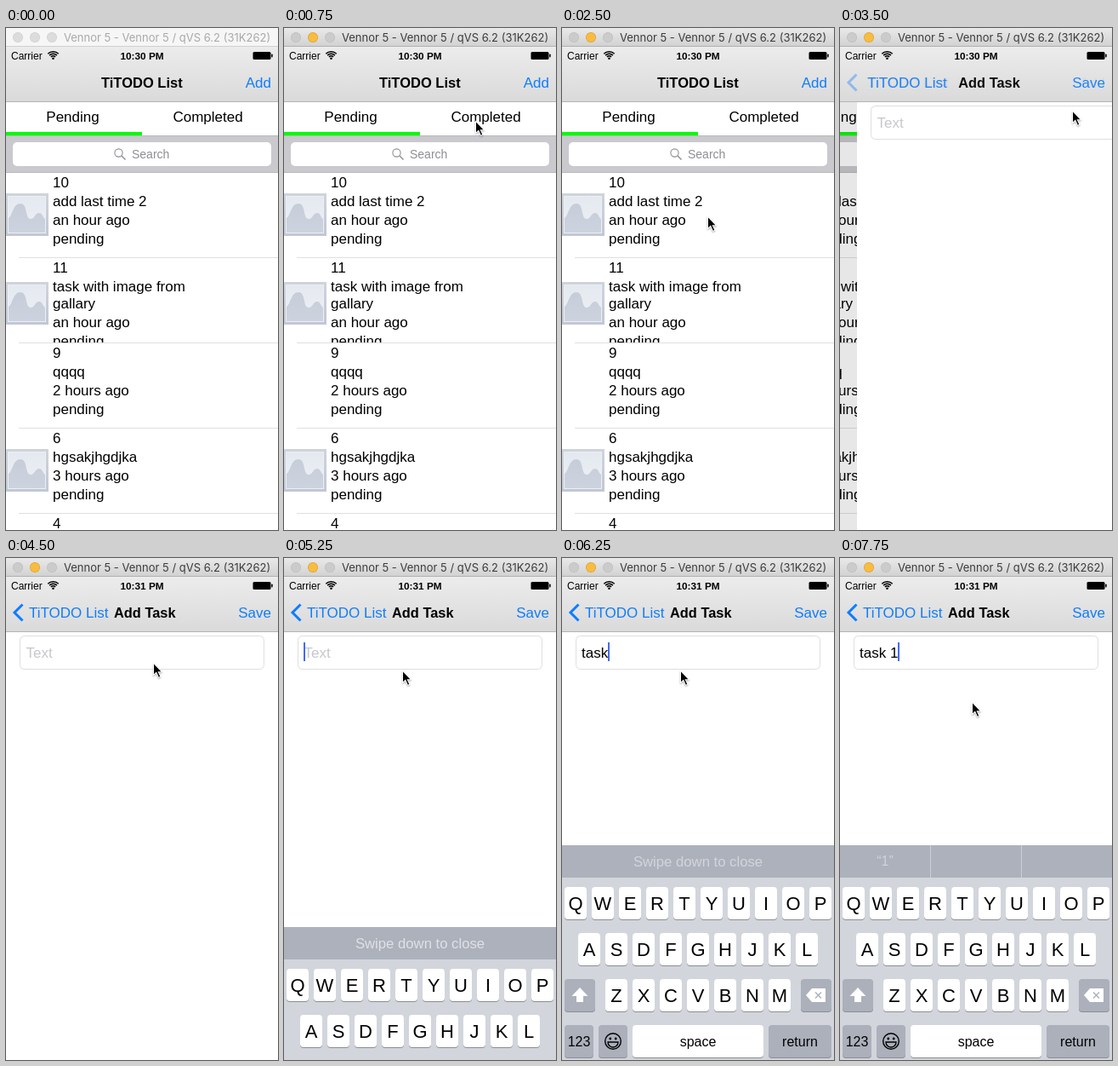
These frames come from a looping animation (320x589 px, 8 s). An HTML page with a canvas:

```html
<!DOCTYPE html>
<html lang="en">
<head>
<meta charset="utf-8">
<title>Todo list demo</title>
<style>
  html, body { margin: 0; width: 100%; height: 100%; overflow: hidden; background: #fff; }
  canvas { display: block; width: 320px; height: 589px; }
</style>
</head>
<body>
<canvas id="stage"></canvas>
<script>
const W = 320, H = 589, LOOP = 8000, STEP = 250;
const SANS = '"Liberation Sans", Arial, sans-serif';
const BLUE = '#0f7dfc';
const canvas = document.getElementById('stage');
const ratio = window.devicePixelRatio || 1;
canvas.width = W * ratio;
canvas.height = H * ratio;
const c = canvas.getContext('2d');
c.scale(ratio, ratio);

const PENDING = [
  { lines: ['10', 'add last time 2', 'an hour ago', 'pending'], pic: 24 },
  { lines: ['11', 'task with image from', 'gallary', 'an hour ago', 'pending'], pic: 28, wrap: true },
  { lines: ['9', 'qqqq', '2 hours ago', 'pending'] },
  { lines: ['6', 'hgsakjhgdjka', '3 hours ago', 'pending'], pic: 24 },
  { lines: ['4'] }
];
const COMPLETED = [
  { lines: ['5', 'Another task', '2 hours ago', 'completed'], pic: 24 },
  { lines: ['7', 'hhey all', '2 hours ago', 'completed'], pic: 24 },
  { lines: ['2', 'Build the app', '3 hours ago', 'completed'], pic: 24 },
  { lines: ['1', 'My Task man', '3 hours ago', 'completed'], pic: 24 },
  { lines: ['3'] }
];

// Pointer stops: time, x, y
const POINTER = [
  [500, 246, 62], [750, 226, 110], [1000, 222, 118], [1500, 222, 118],
  [1750, 160, 90], [2000, 92, 98], [2250, 96, 104], [2500, 172, 222],
  [2750, 220, 150], [3000, 286, 66], [3250, 290, 58], [3500, 274, 98],
  [3750, 274, 98], [4750, 140, 133], [6500, 140, 133], [7500, 156, 170]
];

// Critically damped spring: remaining distance from 1 to 0
function spring(ms) {
  const x = Math.max(0, ms) * 0.018;
  return (1 + x) * Math.exp(-x);
}

function rect(x, y, w, h, fill) {
  c.fillStyle = fill;
  c.fillRect(x, y, w, h);
}

function round(x, y, w, h, r, fill, stroke) {
  c.beginPath();
  c.roundRect(x, y, w, h, r);
  if (fill) { c.fillStyle = fill; c.fill(); }
  if (stroke) { c.strokeStyle = stroke; c.lineWidth = 1; c.stroke(); }
}

function disc(x, y, r, fill) {
  c.beginPath();
  c.arc(x, y, r, 0, 7);
  c.fillStyle = fill;
  c.fill();
}

function poly(points, fill) {
  c.beginPath();
  points.forEach(([x, y]) => c.lineTo(x, y));
  c.closePath();
  c.fillStyle = fill;
  c.fill();
}

function line(points, color, width) {
  c.beginPath();
  points.forEach(([x, y]) => c.lineTo(x, y));
  c.strokeStyle = color;
  c.lineWidth = width;
  c.stroke();
}

function gradient(y, h, top, bottom) {
  const g = c.createLinearGradient(0, y, 0, y + h);
  g.addColorStop(0, top);
  g.addColorStop(1, bottom);
  return g;
}

function text(str, x, y, { size = 17, color = '#000', align = 'left', bold = false, font = SANS } = {}) {
  c.font = `${bold ? 'bold ' : ''}${size}px ${font}`;
  c.fillStyle = color;
  c.textAlign = align;
  c.fillText(str, x, y);
}

function withAlpha(a, draw) {
  if (a <= 0) return;
  c.save();
  c.globalAlpha = Math.min(1, a);
  draw();
  c.restore();
}

function titleBar(active) {
  rect(0, 0, W, 22, active ? gradient(0, 22, '#e9e9e9', '#d1d1d1') : '#f6f6f6');
  rect(0, 21, W, 1, active ? '#b0b0b0' : '#d0d0d0');
  [14, 34, 54].forEach((x, i) => {
    const lit = active && i === 1;
    disc(x, 11, 6, lit ? '#dfa032' : active ? '#bdbdbd' : '#cfcfcf');
    disc(x, 11, 5.3, lit ? '#f8bc3e' : active ? '#cbcbcb' : '#dcdcdc');
  });
  text('Vennor 5 - Vennor 5 / qVS 6.2 (31K262)', 189.5, 16,
    { size: 13, align: 'center', color: active ? '#3c3c3c' : '#a9a9a9', font: 'Inter, sans-serif' });
}

function statusBar(t) {
  text('Carrier', 6, 37, { size: 12 });
  c.strokeStyle = '#000';
  c.lineWidth = 1.6;
  [3.6, 6.2, 8.8].forEach(r => {
    c.beginPath();
    c.arc(55.5, 36.5, r, -Math.PI * 0.75, -Math.PI * 0.25);
    c.stroke();
  });
  disc(55.5, 35.8, 1.3, '#000');
  text(t < 4500 ? '10:30 PM' : '10:31 PM', 160, 36.5, { size: 11.8, bold: true, align: 'center' });
  round(290.5, 28, 21, 9, 1.5, '#000');
  round(312.2, 30.5, 1.5, 4, 1, '#000');
}

function navBar(t, p) {
  rect(0, 22, W, 64, gradient(22, 64, '#ececec', '#dadada'));
  rect(0, 86, W, 1, '#b4b4b4');
  statusBar(t);
  withAlpha(p, () => text('TiTODO List', 112 - 85 * (1 - p), 70, { size: 16.5, bold: true }));
  withAlpha(t === 3250 ? 0.3 : p, () => text('Add', 312, 70, { color: BLUE, align: 'right' }));
  withAlpha(1 - p, () => {
    text('TiTODO List', 27 + 85 * p, 70, { color: BLUE });
    text('Add Task', 127 + 200 * p, 70, { size: 16.4, bold: true });
    text('Save', 292.5, 70, { color: BLUE, align: 'center' });
  });
  withAlpha(1 - p * 10, () => line([[19.5, 54.5], [10, 64], [19.5, 73.5]], BLUE, 3));
}

function thumb(y) {
  c.save();
  c.translate(0, y);
  rect(0, 0, 50, 50, gradient(0, 50, '#cfd3dc', '#c1c7d4'));
  rect(2, 3, 45, 44, '#eceff4');
  rect(3, 4, 43, 42, gradient(4, 42, '#e4e9f0', '#eef1f5'));
  c.beginPath();
  c.moveTo(3, 29);
  c.bezierCurveTo(8, 26, 8, 12, 17, 12);
  c.bezierCurveTo(26, 12, 22, 30, 29, 30);
  c.bezierCurveTo(34, 30, 34, 23, 39, 23);
  c.bezierCurveTo(43, 23, 43, 28, 46, 30);
  c.lineTo(46, 46);
  c.lineTo(3, 46);
  c.fillStyle = gradient(12, 34, '#c6cdd9', '#cdd3de');
  c.fill();
  c.restore();
}

function row(item, y) {
  c.save();
  c.beginPath();
  c.rect(0, y, W, 100);
  c.clip();
  if (item.pic) thumb(y + item.pic);
  item.lines.forEach((str, i) => {
    const shift = item.wrap && i > 1 ? -2 : 0;
    text(str, 55, y + 17 + 22 * i + shift);
  });
  rect(15, y + 99, W - 15, 1, '#e0e0e2');
  c.restore();
}

function listPage(t) {
  const done = t >= 1250 && t < 2250;
  rect(0, 87, W, H - 87, '#fff');
  text('Pending', 78.5, 110, { align: 'center' });
  text('Completed', 237.5, 110, { align: 'center' });
  const bar = t < 2030 ? 160 * (1 - spring(t - 1030)) : 160 * spring(t - 2030);
  rect(Math.round(bar), 122, 160, 4, '#00ff00');
  rect(0, 126, W, 44, '#c9c9ce');
  rect(0, 126, W, 1, '#b8b8bc');
  rect(0, 169, W, 1, '#b8b8bc');
  round(8, 134, 304, 28, 5, '#fff');
  c.beginPath();
  c.arc(132.5, 146.5, 4.6, 0, 7);
  c.strokeStyle = '#8e8e93';
  c.lineWidth = 1.1;
  c.stroke();
  line([[136, 150], [140.5, 154.5]], '#8e8e93', 1.4);
  text('Search', 148, 153, { size: 14, color: '#8e8e93' });
  (done ? COMPLETED : PENDING).forEach((item, i) => row(item, 170 + 100 * i));
}

function typed(t) {
  if (t < 5750) return '';
  if (t < 6000) return 't';
  if (t < 6250) return 'tas';
  if (t < 6750) return 'task';
  return t < 7250 ? 'task ' : 'task 1';
}

function addPage(t) {
  rect(0, 87, W, H - 87, '#fff');
  round(16.5, 91.5, 287, 39, 5, '#fff', '#dedede');
  const str = typed(t);
  if (str) text(str, 23, 116.5);
  else text('Text', 23.5, 116.5, { color: '#c7c7cd' });
  if (t >= 5250) {
    c.font = `17px ${SANS}`;
    rect(23 + Math.round(c.measureText(str).width), 99, 2, 22, '#426bf2');
  }
}

function key(x, y, w, label, size = 22, fill = '#fff') {
  round(x, y + 1, w, 38, 4, '#8a8d93');
  round(x, y, w, 38, 4, fill);
  if (label) text(label, x + w / 2, y + 19 + size * 0.36, { size, align: 'center' });
}

function keyRow(letters, x, y) {
  [...letters].forEach((ch, i) => key(x + 32 * i, y, 26, ch));
}

function suggestions(t) {
  rect(0, 0, W, 38, '#adb1bc');
  if (t < 6750) {
    text('Swipe down to close', 160, 24.5,
      { size: 16.7, align: 'center', color: t < 5500 ? '#dfe1e5' : '#d3d5db' });
    return;
  }
  rect(106, 0, 1, 38, '#cdd0d6');
  rect(213, 0, 1, 38, '#cdd0d6');
  if (t >= 7250) {
    withAlpha(0.65, () => text('“1”', 53, 24, { size: 16, align: 'center', color: '#e4e6ea' }));
  }
}

function smiley(x, y) {
  c.strokeStyle = '#000';
  c.lineWidth = 1.4;
  c.beginPath();
  c.arc(x, y, 9.3, 0, 7);
  c.stroke();
  disc(x - 3.2, y - 3, 1.4, '#000');
  disc(x + 3.2, y - 3, 1.4, '#000');
  c.beginPath();
  c.arc(x, y + 1, 6, 0, Math.PI);
  c.closePath();
  c.stroke();
}

function keyboard(t) {
  const GREY = '#abb0bb', START = 5134;
  if (t < START) return;
  c.save();
  c.translate(0, 337 + Math.round(252 * spring(t - START)));
  rect(0, 38, W, 214, '#d2d5dc');
  suggestions(t);
  keyRow('QWERTYUIOP', 3, 49);
  keyRow('ASDFGHJKL', 19, 103);
  keyRow('ZXCVBNM', 51, 157);
  key(3, 157, 36, '', 0, GREY);
  poly([[21, 167], [30.5, 177], [25, 177], [25, 184], [17, 184], [17, 177], [11.5, 177]], '#fff');
  key(281, 157, 36, '', 0, GREY);
  poly([[287, 176], [294, 168], [310, 168], [310, 184], [294, 184]], '#fff');
  line([[298, 172.5], [305, 179.5]], GREY, 1.5);
  line([[305, 172.5], [298, 179.5]], GREY, 1.5);
  key(3, 211, 34, '123', 16, GREY);
  key(43, 211, 34, '', 0, GREY);
  smiley(60, 230);
  key(83, 211, 154, 'space', 16);
  key(243, 211, 74, 'return', 16, GREY);
  c.restore();
}

function pointer(t) {
  if (t < POINTER[0][0]) return;
  let i = 0;
  while (i < POINTER.length - 1 && POINTER[i + 1][0] <= t) i++;
  const a = POINTER[i], b = POINTER[i + 1] || a;
  const k = b === a ? 0 : (t - a[0]) / (b[0] - a[0]);
  c.save();
  c.translate(Math.round(a[1] + (b[1] - a[1]) * k), Math.round(a[2] + (b[2] - a[2]) * k));
  c.shadowColor = 'rgba(0,0,0,.35)';
  c.shadowBlur = 2 * ratio;
  c.shadowOffsetY = ratio;
  poly([[-1, -1.5], [-1, 14.5], [2.7, 11.2], [5.3, 17], [8.4, 15.6], [5.9, 10.2], [10.5, 10.2]], '#fff');
  c.shadowColor = 'transparent';
  poly([[0, 0.5], [0, 12.3], [3, 9.5], [5.8, 15.7], [7.2, 15], [4.5, 9.2], [8.4, 9.2]], '#000');
  c.restore();
}

function draw(t) {
  const p = spring(t - 3250);
  const edge = Math.round(W * p);
  rect(0, 0, W, H, '#fff');
  if (edge > 0) {
    c.save();
    c.beginPath();
    c.rect(0, 87, edge, H - 87);
    c.clip();
    c.translate(Math.round(-96 * (1 - p)), 0);
    listPage(t);
    c.restore();
    rect(0, 87, edge, H - 87, `rgba(0,0,0,${0.1 * (1 - p)})`);
  }
  if (edge < W) {
    c.save();
    c.translate(edge, 0);
    addPage(t);
    c.restore();
  }
  navBar(t, p);
  titleBar(t >= 500);
  keyboard(t);
  pointer(t);
}

let start;
function frame(now) {
  start ??= now;
  draw(Math.floor(((now - start) % LOOP) / STEP) * STEP);
  requestAnimationFrame(frame);
}
draw(0);
requestAnimationFrame(frame);
</script>
</body>
</html>
```
